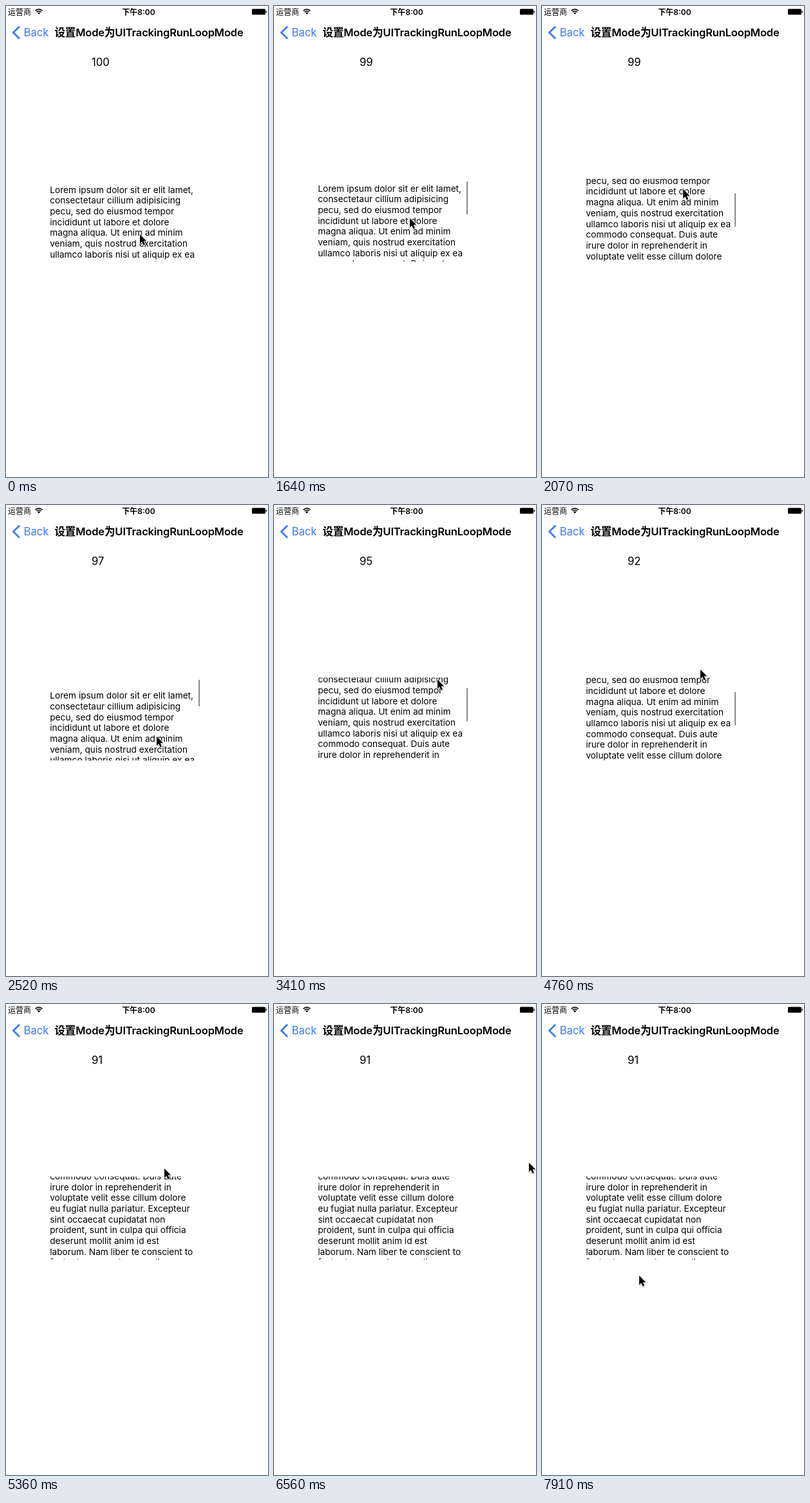
An HTML page with a canvas for the animation above (8000 ms loop, 407 by 730 pixels).

```html
<!DOCTYPE html>
<html lang="zh">
<head>
<meta charset="utf-8">
<title>Run loop mode demo</title>
<style>
  html, body { margin: 0; width: 100%; height: 100%; overflow: hidden; background: #fff; }
  canvas { display: block; width: 407px; height: 730px; }
</style>
</head>
<body>
<canvas id="stage" width="407" height="730"></canvas>
<script>
const ctx = document.getElementById('stage').getContext('2d');
const LOOP = 8000;
const FONT = 'Inter, "Noto Sans CJK SC", "Noto Sans CJK", sans-serif';
const BLUE = '#3a7bf7';
const VIEW = { x: 69, top: 267.5, bottom: 396, right: 302 };
const LINE_HEIGHT = 16.68;
const FINAL_SCROLL = 134.4;
const RELEASE = 4760;

const LINES = [
  'Lorem ipsum dolor sit er elit lamet,',
  'consectetaur cillium adipisicing',
  'pecu, sed do eiusmod tempor',
  'incididunt ut labore et dolore',
  'magna aliqua. Ut enim ad minim',
  'veniam, quis nostrud exercitation',
  'ullamco laboris nisi ut aliquip ex ea',
  'commodo consequat. Duis aute',
  'irure dolor in reprehenderit in',
  'voluptate velit esse cillum dolore',
  'eu fugiat nulla pariatur. Excepteur',
  'sint occaecat cupidatat non',
  'proident, sunt in culpa qui officia',
  'deserunt mollit anim id est',
  'laborum. Nam liber te conscient to',
  'factor tum poen legum odioque',
  'civiuda.'
];

// The screen refreshes in discrete steps.
const range = (count, fn) => Array.from({ length: count }, (_, i) => fn(i));
const DRAG_STEPS = [
  ...range(8, i => 1640 + Math.floor(i * 880 / 60) * 10),
  ...range(18, i => 2810 + i * 150)
];
const STEPS = [0, 440, ...DRAG_STEPS, ...range(10, i => 6560 + i * 150)];

// Pointer turning points: time, x, y
const POINTER = [
  [1640, 211, 329], [2070, 222, 269], [2810, 240.2, 405], [3410, 254, 270.5],
  [4010, 251, 405], [RELEASE, 246, 255], [6559, 246, 255],
  [6560, 396, 246], [7460, 162, 390], [7760, 152, 459], [7910, 151, 421]
];

const clamp = v => Math.min(1, Math.max(0, v));
const mix = (a, b, p) => a + (b - a) * p;
const smooth = p => p * p * (3 - 2 * p);

function pointerAt(t) {
  if (t < 1640) return [t < 440 ? 208 : 206.5, 354];
  const next = POINTER.findIndex(k => k[0] > t);
  if (next < 0) return POINTER[POINTER.length - 1].slice(1);
  const a = POINTER[next - 1], b = POINTER[next];
  const p = smooth((t - a[0]) / (b[0] - a[0]));
  return [mix(a[1], b[1], p), mix(a[2], b[2], p)];
}

function scrollAt(t) {
  if (t < 1640) return 0;
  if (t > RELEASE) {
    const p = clamp((t - RELEASE) / 600);
    return mix(47, FINAL_SCROLL, 1 - (1 - p) ** 3);
  }
  const grip = mix(331, 301.5, clamp((t - 2520) / 890));
  const raw = grip - pointerAt(t)[1];
  if (raw >= 0) return raw;
  const pull = -raw * 0.42;
  return -pull / (1 + pull / 128);
}

function counterAt(t) {
  const done = DRAG_STEPS.filter(s => s <= t).length;
  return 100 - Math.ceil(Math.min(done, 25) / 3);
}

function text(str, x, y, size, { weight = 400, color = '#000', align = 'left', spacing = 0 } = {}) {
  ctx.font = `${weight} ${size}px ${FONT}`;
  ctx.letterSpacing = spacing + 'px';
  ctx.textAlign = align;
  ctx.fillStyle = color;
  ctx.fillText(str, x, y);
}

function pill(x, y, w, h, r, color) {
  ctx.fillStyle = color;
  ctx.beginPath();
  ctx.roundRect(x, y, w, h, r);
  ctx.fill();
}

function polygon(points) {
  ctx.beginPath();
  points.forEach(([x, y]) => ctx.lineTo(x, y));
}

function drawWifi(x, y) {
  const from = -Math.PI * 0.75, to = -Math.PI * 0.25;
  ctx.strokeStyle = ctx.fillStyle = '#000';
  ctx.lineWidth = 1.7;
  for (const r of [7.8, 5]) {
    ctx.beginPath();
    ctx.arc(x, y, r, from, to);
    ctx.stroke();
  }
  ctx.beginPath();
  ctx.moveTo(x, y);
  ctx.arc(x, y, 3, from, to);
  ctx.fill();
}

function drawBars() {
  text('运营商', 3, 14, 12);
  drawWifi(51, 13);
  text('下午8:00', 206, 14, 12, { weight: 600, align: 'center' });
  pill(382, 4.5, 21, 9, 1.5, '#000');
  pill(403.6, 7.3, 1.4, 3.4, 0.7, '#000');

  polygon([[21, 31.8], [11.3, 41.3], [21, 50.8]]);
  ctx.strokeStyle = BLUE;
  ctx.lineWidth = 2.7;
  ctx.stroke();
  text('Back', 27.5, 47, 16.7, { color: BLUE });
  text('设置Mode为UITrackingRunLoopMode', 222, 47, 16.6, { weight: 600, align: 'center', spacing: -0.2 });
}

function drawTextView(scroll, showIndicator) {
  ctx.save();
  ctx.beginPath();
  ctx.rect(VIEW.x - 2, VIEW.top, VIEW.right - VIEW.x + 2, VIEW.bottom - VIEW.top);
  ctx.clip();
  LINES.forEach((line, i) => text(line, 68.2, 289.5 + i * LINE_HEIGHT - scroll, 13.7));
  ctx.restore();
  if (showIndicator) {
    pill(299, 270.8 + Math.max(0, scroll) * 0.41, 2.2, 52 + Math.min(0, scroll), 1.1, '#8f8f8f');
  }
}

function drawPointer([x, y]) {
  ctx.save();
  ctx.translate(x, y);
  polygon([[0, 0], [0, 14.2], [3.2, 11.2], [5.6, 16.6], [8, 15.5], [5.7, 10.3], [10.2, 10.3]]);
  ctx.closePath();
  ctx.lineJoin = 'round';
  ctx.shadowColor = 'rgba(0,0,0,0.35)';
  ctx.shadowBlur = 2;
  ctx.shadowOffsetY = 1;
  ctx.strokeStyle = '#fff';
  ctx.lineWidth = 1.6;
  ctx.stroke();
  ctx.shadowColor = 'transparent';
  ctx.fillStyle = '#000';
  ctx.fill();
  ctx.restore();
}

function render(now) {
  const elapsed = now % LOOP;
  const t = STEPS.filter(s => s <= elapsed).pop();
  ctx.fillStyle = '#fff';
  ctx.fillRect(0, 0, 407, 730);
  drawBars();
  text(counterAt(t), 133, 93, 16.7);
  drawTextView(scrollAt(t), t >= 1640 && t < 5360);
  drawPointer(pointerAt(t));
}

const start = performance.now();
function tick() {
  render(performance.now() - start);
  requestAnimationFrame(tick);
}
tick();
</script>
</body>
</html>
```
